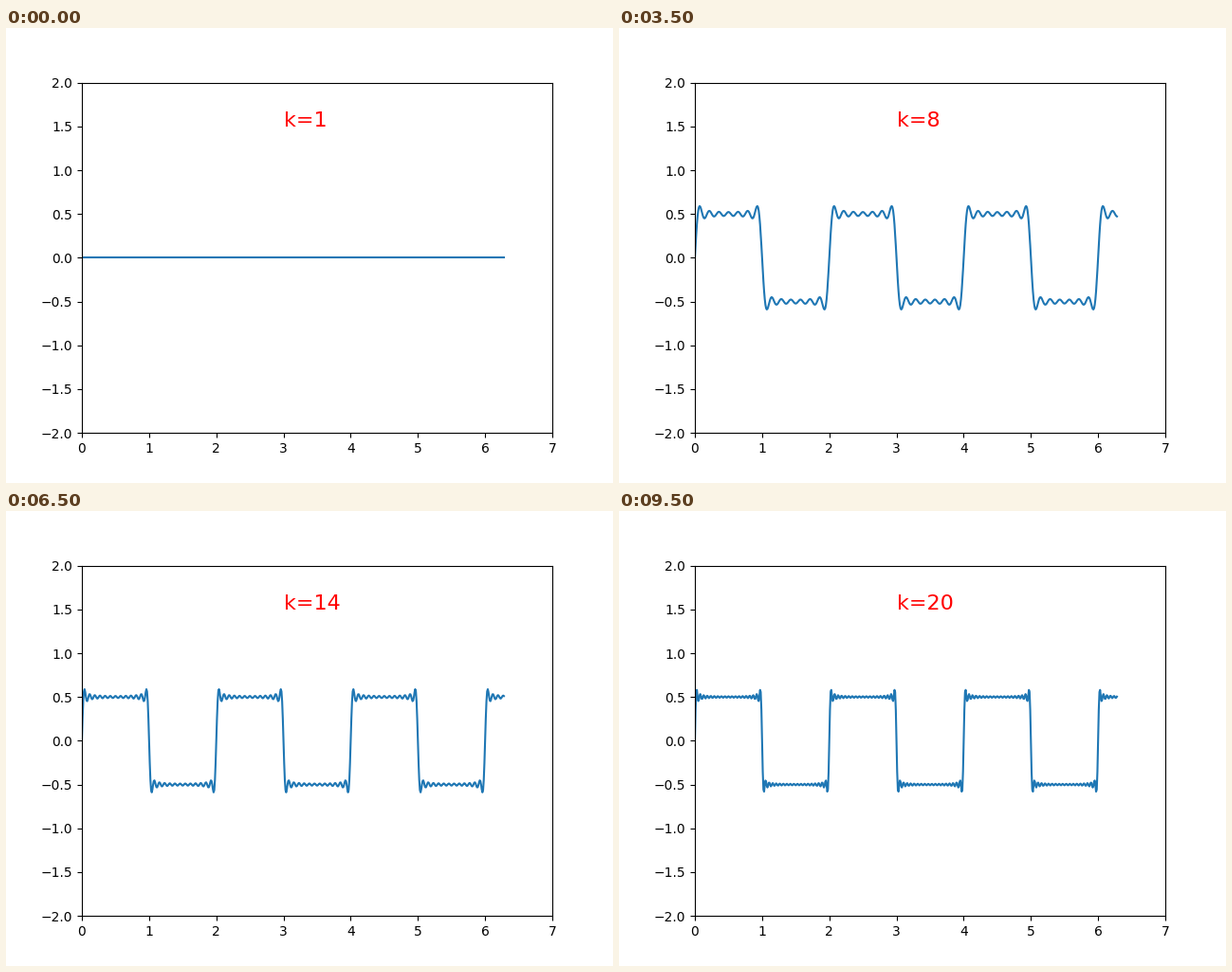
A matplotlib script that plays this animation: 640 by 480 pixels, repeating every 10 s.

```python
import numpy as np
import matplotlib.pyplot as plt
from matplotlib.animation import FuncAnimation

FRAMES = 20
INTERVAL = 500  # ms

x = np.arange(0, 2 * np.pi, 0.01)


def square_wave(terms):
    """Partial Fourier sum of a square wave with period 2 and amplitude 0.5."""
    y = np.zeros_like(x)
    for n in range(1, 2 * terms, 2):
        y += 2 / (np.pi * n) * np.sin(n * np.pi * x)
    return y


fig, ax = plt.subplots(figsize=(6.4, 4.8), dpi=100)
ax.set_xlim(0, 7)
ax.set_ylim(-2, 2)
line, = ax.plot(x, square_wave(0))
label = ax.text(3, 1.5, "k=1", fontsize=16, color="red")


def update(frame):
    line.set_ydata(square_wave(frame))
    label.set_text(f"k={frame + 1}")
    return line, label


anim = FuncAnimation(fig, update, frames=FRAMES, interval=INTERVAL,
                     repeat=True, repeat_delay=0)
plt.show()
```
